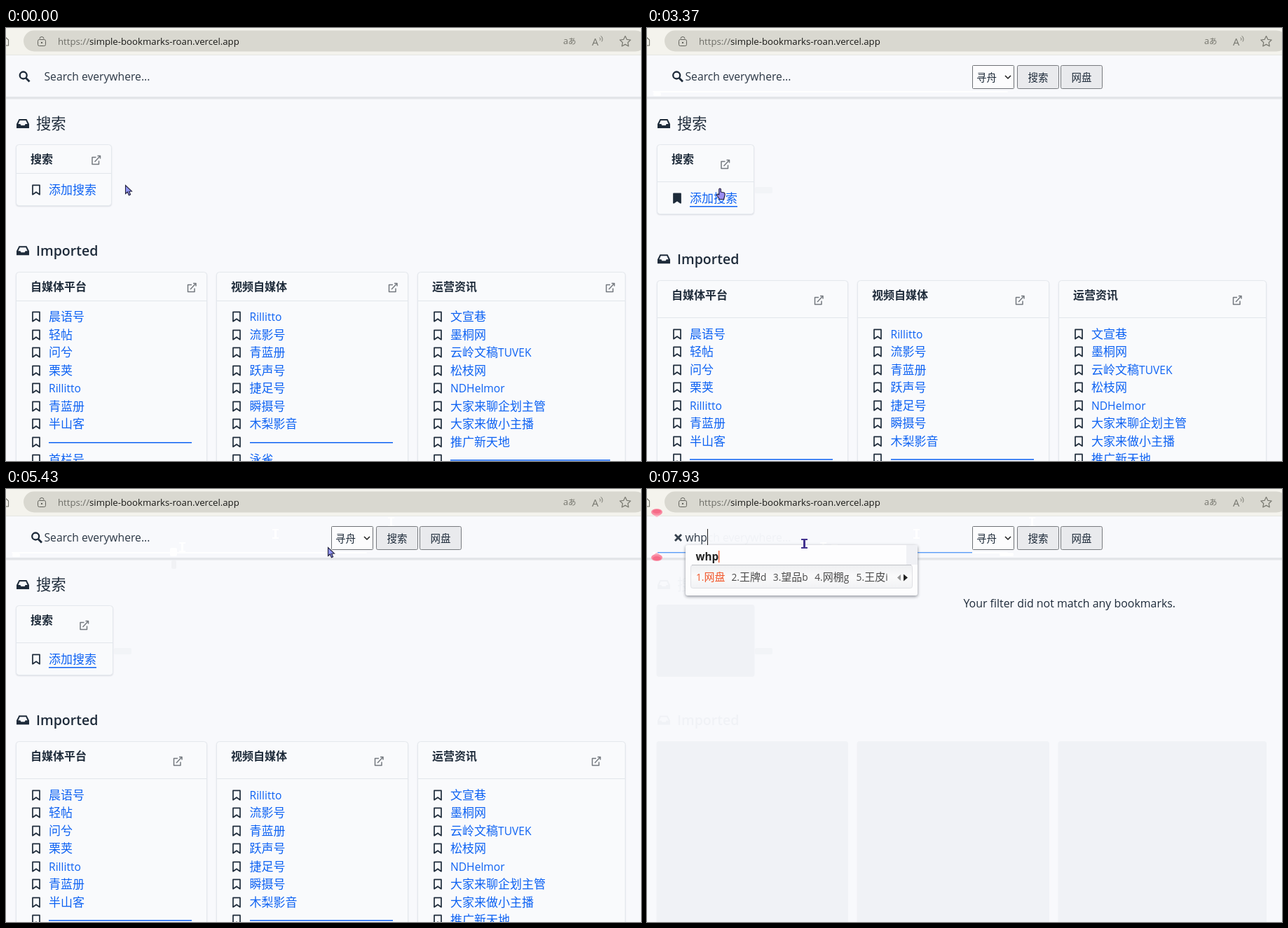
Recreate the animation shown at these times as an HTML page with a canvas. Size 906 px wide and 618 px high, loop 8000 ms.

```html
<!DOCTYPE html>
<html lang="zh-CN">
<head>
<meta charset="utf-8">
<title>Bookmarks</title>
<style>
html, body { margin: 0; width: 100%; height: 100%; overflow: hidden; background: #f8f9fc; }
canvas { display: block; }
</style>
</head>
<body>
<canvas id="stage" width="906" height="618"></canvas>
<script>
const ctx = document.getElementById('stage').getContext('2d');
const LOOP = 8000;
const BG = '#f8f9fc', INK = '#1e2b3a', LINK = '#0d62f3', GHOST = '#f0f2f6';
const LATIN = '"Open Sans", "Noto Sans", sans-serif';
const HAN = '"Noto Sans CJK SC", "Noto Sans CJK", "Noto Sans CJK JP", sans-serif';

const columns = [
  { x: 14, w: 272, link: 61, title: '自媒体平台', dash: [61, 265],
    rows: ['晨语号', '轻帖', '问兮', '栗荚', 'Rillitto', '青蓝册', '半山客', '-', '首栏号'] },
  { x: 300, w: 273, link: 347.5, title: '视频自媒体', dash: [348, 552],
    rows: ['Rillitto', '流影号', '青蓝册', '跃声号', '捷足号', '瞬摄号', '木梨影音', '-', '泳雀'] },
  { x: 587, w: 296, link: 634, title: '运营资讯', dash: [634, 862],
    rows: ['文宣巷', '墨桐网', '云岭文稿TUVEK', '松枝网', 'NDHelmor', '大家来聊企划主管',
      '大家来做小主播', '推广新天地', '-'] }
];

// time, x, y of the pointer's hot spot, shape, 1 = rest until the next entry
const track = [
  [0, 170, 224, 'arrow'], [130, 170, 224, 'arrow'], [330, 150, 222, 'arrow'],
  [530, 130, 220, 'arrow'], [580, 124, 221, 'hand'], [840, 104, 229, 'hand', 1],
  [3420, 103, 229, 'arrow', 1], [3790, 103, 229, 'arrow'], [3990, 150, 195, 'arrow'],
  [4190, 236, 84, 'arrow', 1], [4410, 233, 83, 'arrow', 1], [4580, 233, 82, 'arrow', 1],
  [4820, 250, 83, 'beam'], [4920, 384, 64, 'beam'], [5020, 500, 52, 'beam'],
  [5120, 549, 47, 'beam'], [5220, 576, 52, 'arrow'], [5330, 530, 70, 'arrow'],
  [5430, 459, 83, 'arrow'], [5480, 267, 86, 'beam'], [5530, 240, 86, 'beam', 1],
  [5660, 238, 85, 'beam'], [5900, 228, 79, 'beam', 1], [6500, 224, 78, 'beam', 1]
];

const candidates = {
  w: ['我', '问w', '玩w', '王w', '为w'],
  wh: ['文化', '维护h', '网红h', '午后h', '外海h'],
  whp: ['网盘', '王牌d', '望品b', '网棚g', '王皮i']
};

function rect(x, y, w, h, color) {
  ctx.fillStyle = color;
  ctx.fillRect(x, y, w, h);
}

function box(x, y, w, h, r, fill, stroke) {
  ctx.beginPath();
  ctx.roundRect(x, y, w, h, r);
  if (fill) { ctx.fillStyle = fill; ctx.fill(); }
  if (stroke) { ctx.strokeStyle = stroke; ctx.lineWidth = 1; ctx.stroke(); }
}

function trace(points, close) {
  points.forEach(([x, y], i) => i ? ctx.lineTo(x, y) : ctx.moveTo(x, y));
  if (close) ctx.closePath();
}

function poly(points) {
  ctx.beginPath();
  trace(points, true);
}

function line(points, color, width) {
  ctx.beginPath();
  trace(points, false);
  ctx.strokeStyle = color;
  ctx.lineWidth = width;
  ctx.stroke();
}

function at(x, y, draw) {
  ctx.save();
  ctx.translate(x, y);
  draw();
  ctx.restore();
}

// Han runs take the full size, Latin runs a little less. Returns the end x.
function text(s, x, y, size, color = INK, weight = 400) {
  ctx.fillStyle = color;
  for (const run of s.match(/[\u3040-\u9fff]+|[^\u3040-\u9fff]+/g) || []) {
    const han = run.charCodeAt(0) > 0x3000;
    ctx.font = `${weight} ${han ? size : size * 0.918}px ${han ? HAN : LATIN}`;
    ctx.fillText(run, x, Math.round(y));
    x += ctx.measureText(run).width;
  }
  return x;
}

function tray(x, y, color) {
  at(x, y, () => {
    ctx.fillStyle = color;
    ctx.beginPath();
    trace([[-5.5, -7], [5.5, -7], [9, 0], [9, 6], [-9, 6], [-9, 0]], true);
    trace([[-4.3, -5], [4.3, -5], [6.6, 0], [3.6, 0], [2.6, 2], [-2.6, 2], [-3.6, 0], [-6.6, 0]], true);
    ctx.fill('evenodd');
  });
}

function bookmark(x, y, solid) {
  at(x, y, () => {
    poly([[-5, -6.7], [5, -6.7], [5, 6.7], [0, 3.2], [-5, 6.7]]);
    ctx.lineJoin = 'round';
    ctx.lineWidth = 1.7;
    ctx.strokeStyle = ctx.fillStyle = INK;
    if (solid) ctx.fill();
    ctx.stroke();
  });
}

function external(x, y) {
  const gray = '#74797f';
  at(x, y, () => {
    line([[0, -4], [-5.5, -4], [-5.5, 6], [4, 6], [4, 1]], gray, 1.5);
    line([[-2, 2.5], [5.5, -5.5]], gray, 1.5);
    line([[2, -6], [6, -6], [6, -2]], gray, 1.5);
  });
}

function magnifier(x) {
  ctx.beginPath();
  ctx.arc(x - 1.8, 67.5, 5, 0, 7);
  ctx.strokeStyle = INK;
  ctx.lineWidth = 2.3;
  ctx.stroke();
  line([[x + 2, 71.5], [x + 7, 76.5]], INK, 2.8);
}

function arrow(x, y) {
  at(x, y, () => {
    poly([[0.5, 0.5], [0.5, 12.5], [3.3, 10], [5.4, 14.8], [7.6, 13.8], [5.6, 9.3], [9.5, 9]]);
    ctx.lineJoin = 'miter';
    ctx.fillStyle = '#9295f3';
    ctx.fill();
    ctx.strokeStyle = '#20203c';
    ctx.lineWidth = 1.1;
    ctx.stroke();
  });
}

function hand(x, y) {
  at(x, y, () => {
    ctx.beginPath();
    ctx.moveTo(-1.2, 9);
    ctx.lineTo(-1.2, 1);
    ctx.quadraticCurveTo(0, -1, 1.4, 1);
    ctx.lineTo(1.4, 5);
    ctx.lineTo(6, 6);
    ctx.quadraticCurveTo(7.5, 6.5, 7, 10);
    ctx.lineTo(5.5, 15.5);
    ctx.lineTo(-0.5, 15.5);
    ctx.lineTo(-4.5, 9.5);
    ctx.quadraticCurveTo(-4, 7, -1.2, 9);
    ctx.closePath();
    ctx.fillStyle = '#9a8df0';
    ctx.fill();
    ctx.strokeStyle = '#25213f';
    ctx.lineWidth = 1.2;
    ctx.stroke();
  });
}

function beam(x, y, color = '#43338f') {
  const left = Math.round(x) - 4, top = Math.round(y) - 7;
  rect(left, top, 9, 2, color);
  rect(left + 3, top, 3, 14, color);
  rect(left, top + 12, 9, 2, color);
}

// The pointer is sampled every 50 ms
function pointer(t) {
  let i = track.length - 1;
  while (track[i][0] > t) i--;
  const [start, x0, y0, shape, rest] = track[i];
  let x = x0, y = y0;
  if (!rest) {
    const [end, x1, y1] = track[i + 1];
    const k = Math.floor((t - start) / 50) * 50 / (end - start);
    x += (x1 - x0) * k;
    y += (y1 - y0) * k;
  }
  ({ arrow, hand, beam })[shape](x, y);
}

function browserBar() {
  rect(0, 0, 906, 39, '#f4f3ed');
  rect(0, 38, 906, 1, '#e6e6e2');
  box(25, 3.5, 888, 30, 15, '#d9d8d0');
  const gray = '#77776f';
  line([[-1, 13], [3.5, 17], [3.5, 25], [0, 25]], gray, 1.2);
  box(45.5, 16.5, 11, 9, 2, null, '#62625c');
  ctx.beginPath();
  ctx.arc(51, 15.5, 3, Math.PI, 0);
  ctx.stroke();
  rect(50, 20, 2, 2, '#62625c');
  const x = text('https://', 74, 24, 14.4, '#6d6d67');
  text('simple-bookmarks-roan.vercel.app', x, 24, 14.4, '#191917');
  text('a', 795, 23, 14, gray);
  text('あ', 802, 23, 11.5, gray);
  text('A', 836, 25, 16, gray);
  ctx.strokeStyle = gray;
  ctx.lineWidth = 1;
  for (const r of [3, 6]) {
    ctx.beginPath();
    ctx.arc(845, 16, r, -0.9, 0.6);
    ctx.stroke();
  }
  poly(Array.from({ length: 10 }, (_, i) => {
    const r = i % 2 ? 3.9 : 8, a = i * Math.PI / 5 - Math.PI / 2;
    return [883.5 + r * Math.cos(a), 19.5 + r * Math.sin(a)];
  }));
  ctx.lineJoin = 'round';
  ctx.lineWidth = 1.2;
  ctx.stroke();
}

function card(x, y, w, h, head, title, iconX, iconY) {
  ctx.save();
  ctx.shadowColor = 'rgba(40,55,75,.2)';
  ctx.shadowBlur = 2;
  ctx.shadowOffsetY = 1;
  box(x + 0.5, y + 0.5, w, h, 4, '#f9fafc');
  ctx.restore();
  box(x + 0.5, y + 0.5, w, h, 4, null, '#e4e8ed');
  rect(x + 1, y + head, w - 1, 1, '#e1e6eb');
  text(title, x + 21, y + 27.4, 16, INK, 700);
  external(iconX, iconY);
}

function page(t) {
  const wide = t >= 3370;
  const hover = t >= 580 && t < 3420;
  const head = wide ? 53 : 41;
  tray(24, 137, INK);
  text('搜索', 43, 144, 21.3);
  card(14, 166, wide ? 138 : 136, wide ? 99 : 87, head, '搜索',
    wide ? 111.5 : 128.5, wide ? 194.5 : 188.5);
  const y = wide ? 243 : 231;
  bookmark(43, y, hover);
  text('添加搜索', 61, y + 6, 17, LINK);
  if (t >= 580 && t < 6080) rect(61, y + 11, 68, 1.5, LINK);

  const top = wide ? 360 : 348;
  tray(24, top - 29.7, INK);
  text('Imported', 43, top - 23.5, 21.3, INK, 600);
  for (const c of columns) {
    const edge = c.x + c.w - 21;
    card(c.x, top, c.w, 400, head, c.title, wide ? edge - 20 : edge, top + (wide ? 28.5 : 22.5));
    c.rows.forEach((name, i) => {
      const ry = Math.round((wide ? 436.7 : 412) + i * 25.5);
      bookmark(c.x + 29, ry, false);
      if (name === '-') rect(c.dash[0], ry, c.dash[1] - c.dash[0], 1.5, LINK);
      else text(name, c.link, ry + 6, 17, LINK);
    });
  }
}

// What is left of the page once the filter hides it
function ghostPage() {
  tray(24, 137, GHOST);
  text('搜索', 43, 144, 21.3, GHOST);
  box(13.5, 165, 140, 103, 4, GHOST);
  tray(24, 330.5, GHOST);
  text('Imported', 43, 337, 21.3, GHOST, 600);
  for (const c of columns) box(c.x - 0.5, 360, c.w + 1.5, 300, 4, GHOST);
  text('Your filter did not match any bookmarks.', 451.5, 168.5, 17.35);
}

function button(x, label) {
  box(x + 0.5, 53.5, 59, 33, 2, '#e9eaed', '#777a7e');
  text(label, x + 15.5, 75.5, 14.5);
}

function blobs(scale) {
  for (const [y, dir] of [[34, 1], [97, -1]]) {
    at(14, y, () => {
      ctx.scale(scale, scale * dir);
      ctx.fillStyle = '#fbc0cd';
      poly([[-7, 1], [7, 1], [1, 6], [-1, 6]]);
      ctx.fill();
      ctx.beginPath();
      ctx.ellipse(0, -1, 8, 4.8, 0, 0, 7);
      ctx.fillStyle = '#f98ba2';
      ctx.fill();
      ctx.beginPath();
      ctx.ellipse(0, -2, 6, 3, 0, 0, 7);
      ctx.fillStyle = '#f66b88';
      ctx.fill();
    });
  }
}

// The underline spreads and the dots grow in three steps
function focusMark(step, ends) {
  rect(15, 90, ends[step] - 15, 1.4, '#5a9bf6');
  blobs(0.6 + 0.2 * step);
}

function trails(t) {
  const marks = [
    [840, 154, 227, 25, 9, '#f2f4f7'], [1210, 8, 90, 507, 2, '#fff'],
    [1210, 9, 92, 11, 5, '#fff'], [4820, 234, 84, 10, 12, '#fff'],
    [4820, 236, 102, 7, 12, '#f1f2f5'], [5480, 503, 91, 20, 5, '#fff']
  ];
  for (const [from, x, y, w, h, color] of marks) if (t >= from) box(x, y, w, h, 2, color);
  const beams = [[4870, 251, 83], [4970, 384, 64], [5220, 549, 47], [5530, 267, 86]];
  for (const [from, x, y] of beams) if (t >= from) beam(x, y, '#fff');
}

function imeWindow(typed) {
  ctx.save();
  ctx.shadowColor = 'rgba(40,45,60,.55)';
  ctx.shadowBlur = 4;
  ctx.shadowOffsetY = 1.5;
  box(55, 80, 331, 72, 3, '#fdfdfe');
  ctx.restore();
  rect(370, 80, 16, 28, '#f0f1f5');
  const end = text(typed, 69.5, 101.5, 16.6, '#222', 700);
  rect(Math.round(end), 88, 1.3, 17, '#f0562a');
  const shade = ctx.createLinearGradient(0, 108, 0, 142);
  shade.addColorStop(0, '#eeeff1');
  shade.addColorStop(0.5, '#fafafb');
  shade.addColorStop(1, '#f1f2f4');
  box(62.5, 108.5, 316, 33, 3, shade, '#dfe0e4');
  rect(64, 108, 313, 1, '#bfc1c6');
  candidates[typed].forEach((word, i) =>
    text(`${i + 1}.${word}`, 61 + 59.4 * i + (i ? 0 : 9), 131, 15, i ? '#4a4a4a' : '#f0562a'));
  ctx.fillStyle = '#999';
  poly([[357, 126.5], [362, 122], [362, 131]]);
  ctx.fill();
  ctx.fillStyle = '#222';
  poly([[372, 126.5], [366, 121.5], [366, 131.5]]);
  ctx.fill();
}

function searchBar(t, typed) {
  rect(0, 98, 906, 3.5, '#e3e5e9');
  if (typed) {
    line([[40, 65], [49, 74]], '#35404d', 2.8);
    line([[49, 65], [40, 74]], '#35404d', 2.8);
    ctx.save();
    ctx.beginPath();
    ctx.rect(88, 50, 130, 40);
    ctx.clip();
    text('Search everywhere...', 54.5, 75, 17.1, GHOST);
    ctx.restore();
  } else {
    magnifier(t >= 3370 ? 44 : 26.5);
    text('Search everywhere...', 54.5, 75, 17.1, '#2c3846');
  }
  if (t < 3370) return;
  box(464.5, 53.5, 59, 33, 1, '#fcfcfd', '#6d7075');
  text('寻舟', 470, 75.5, 14.5);
  line([[511, 68], [515, 72], [519, 68]], '#222', 1.6);
  button(528, '搜索');
  button(590, '网盘');
}

function render(t) {
  const typed = t < 7640 ? '' : t < 7740 ? 'w' : t < 7840 ? 'wh' : 'whp';
  rect(0, 0, 906, 618, BG);
  browserBar();
  trails(t);
  if (t < 7740) page(t); else ghostPage();
  searchBar(t, typed);

  if (t >= 980 && t < 1210) focusMark(Math.floor((t - 980) / 77), [220, 400, 515]);
  if (t >= 6080) {
    focusMark(Math.min(2, Math.floor((t - 6080) / 85)), [240, 400, 464]);
    const end = typed ? text(typed, 54.5, 75, 17.1, '#2c3846') : 55;
    if (typed || t < 6750 || t >= 7260) rect(Math.round(end), 57, 1, 23, '#222');
  }
  if (typed) imeWindow(typed);
  pointer(t);
}

function tick(now) {
  render(now % LOOP);
  requestAnimationFrame(tick);
}
requestAnimationFrame(tick);
</script>
</body>
</html>
```
